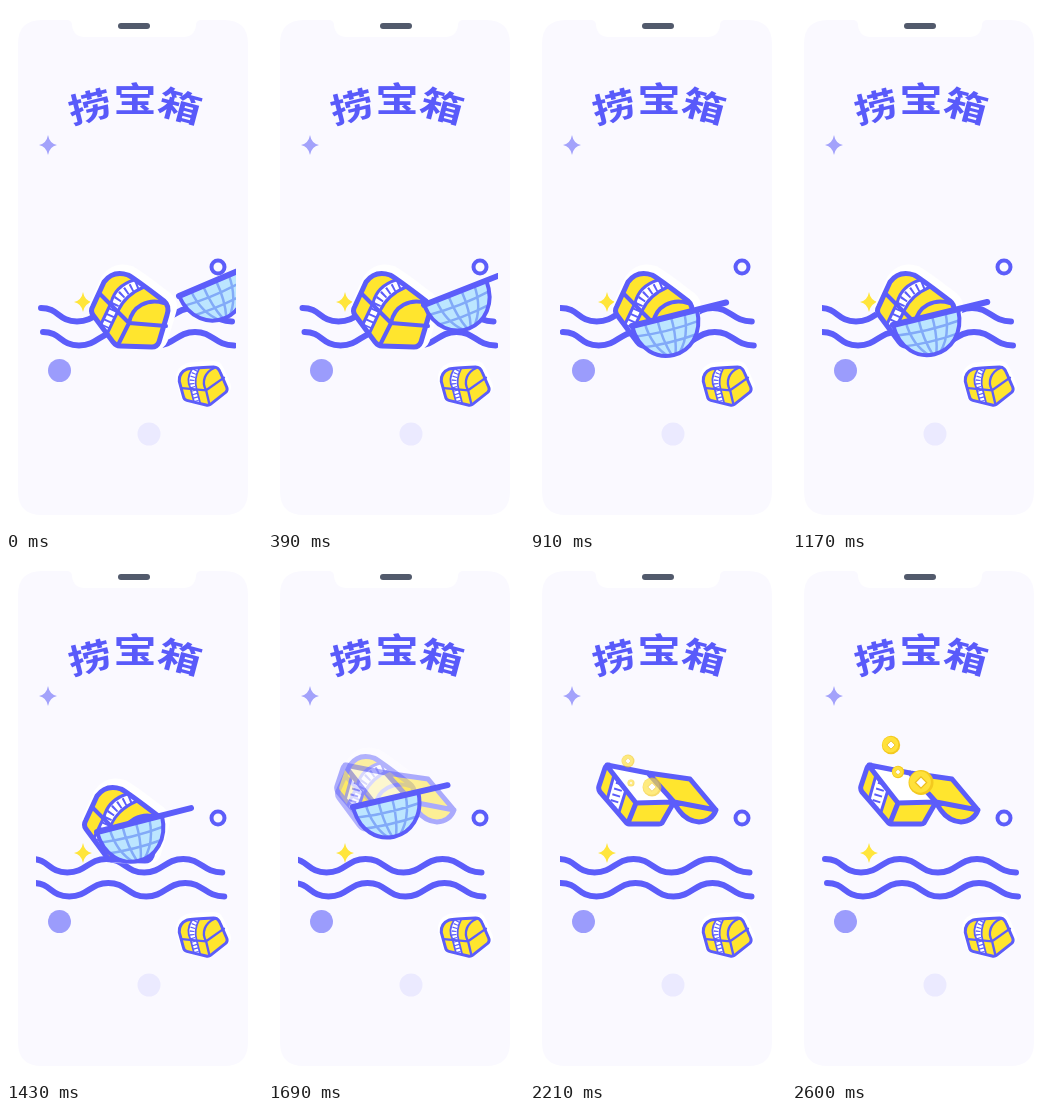
Recreate the animation shown at these times as an HTML page. Size 256x523 px, loop 3120 ms.

```html
<!DOCTYPE html>
<html lang="zh">
<head>
<meta charset="utf-8">
<style>
  html, body { margin: 0; width: 100%; height: 100%; overflow: hidden; background: #fff; }
  svg { display: block; width: 100%; height: 100%; }
  .line { fill: none; stroke: #5c5dfa; stroke-linecap: round; stroke-linejoin: round; }
  .title { font: 700 35px "Noto Sans CJK SC", "Noto Sans CJK", sans-serif; fill: #595afa; text-anchor: middle; }
</style>
</head>
<body>
<svg viewBox="0 0 256 523">
  <defs>
    <clipPath id="scene"><rect x="30" y="150" width="200" height="230"/></clipPath>
    <path id="wave" d="M33 302C51 302 50 315.500 69 315.500S90 302 108 302S128 315.500 146 315.500S167 302 185 302S205 315.500 224 315.500"/>
    <path id="shell" d="M87 300L98 276Q107 264 122 269Q128 272 158 295Q164 300 161 309L153 336Q151 341 146 341L114 340Q110 340 107 336L87 309Q84 305 87 300Z"/>
    <path id="bowl" d="M0 0C1 51 66 51 67 0Z"/>
    <clipPath id="bowlClip"><use href="#bowl"/></clipPath>
    <path id="star" d="M0-10Q1.500-1.500 9 0Q1.500 1.500 0 10Q-1.500 1.500-9 0Q-1.500-1.500 0-10Z"/>

    <g id="closedChest">
      <use href="#shell" transform="translate(3 -3)" fill="#fff" stroke="#fff" stroke-width="12"/>
      <use href="#shell" fill="#ffe52e"/>
      <path d="M128 274Q109 280 105 297L95 318L101 328L112 305Q119 289 138 281Z" fill="#fff"/>
      <path d="M132 279Q113 286 108 301L99 321" fill="none" stroke="#5c5dfa" stroke-width="8" stroke-dasharray="2 4"/>
      <path class="line" stroke-width="3" d="M128 274Q109 280 105 297L95 318M138 281Q119 289 112 305L101 328"/>
      <path class="line" stroke-width="4" d="M94 288L123 317L160 320M123 317L112 339M123 317C126 300 142 292 158 297"/>
      <use href="#shell" class="line" stroke-width="5"/>
    </g>

    <g id="coin">
      <circle r="10" fill="#f3c91f"/>
      <circle cx="-.7" cy="-.4" r="8.600" fill="#ffe13a"/>
      <path d="M0-4.500L4.500 0L0 4.500L-4.500 0Z" fill="#fff" stroke="#eebf20"/>
    </g>
  </defs>

  <path fill="#faf9ff" d="M36 14H60Q66 14 66 19Q67 31 79 31H177Q189 31 190 19Q190 14 196 14H218Q242 14 242 38V485Q242 509 218 509H36Q12 509 12 485V38Q12 14 36 14Z"/>
  <rect x="112" y="17" width="32" height="6" rx="3" fill="#525a6c"/>

  <g class="title">
    <text transform="translate(84 101) rotate(-14) scale(1.24 .98)" y="13">捞</text>
    <text transform="translate(129 93) scale(1.24 .98)" y="13">宝</text>
    <text transform="translate(174 100) rotate(15) scale(1.24 .98)" y="13">箱</text>
  </g>

  <use href="#star" transform="translate(42 139)" fill="#a3a2fb"/>
  <circle cx="53.500" cy="364.500" r="11.500" fill="#9b9cfc"/>
  <circle cx="143" cy="428" r="11.500" fill="#ebeaff"/>
  <circle class="line" cx="212" cy="261" r="6.500" stroke-width="4"/>
  <use href="#closedChest" transform="translate(196 378.500) rotate(-40) scale(.59) translate(-124 -305)"/>

  <g clip-path="url(#scene)">
    <g id="waves" class="line" stroke-width="6">
      <use href="#wave"/>
      <use href="#wave" x="2" y="24"/>
    </g>
    <use href="#star" transform="translate(77 296)" fill="#ffe53b"/>
    <use id="closed" href="#closedChest"/>

    <g id="open">
      <path fill="#fff" d="M77 208L118 216L144 245L106 246Z"/>
      <path fill="#ffe52e" d="M77 208L106 246L98 267L68 232ZM106 246L144 245L132 267H98ZM118 216L160 222L186 253Q166 276 144 245Z"/>
      <path fill="#fff" d="M84 218L96 233L89 255L77 243Z"/>
      <path d="M90 226L83 249" fill="none" stroke="#5c5dfa" stroke-width="8" stroke-dasharray="2 4"/>
      <path class="line" stroke-width="3" d="M84 218L77 243M96 233L89 255"/>
      <path class="line" stroke-width="5" d="M77 208L118 216L160 222L186 253Q182 264 169 265Q153 264 144 245L118 216M144 245L186 253M144 245L132 266Q131 267 129 267H99Q97 267 95 264L70 235Q68 232 69 229L75 211Q76 208 79 208M77 209L106 246L144 245M106 246L98 266"/>
    </g>

    <g id="net">
      <use href="#bowl" fill="#bce6ff"/>
      <g clip-path="url(#bowlClip)" fill="none" stroke="#82aaf8" stroke-width="2.500">
        <path d="M13 0Q14 25 29 39M26 0Q26 22 32 39M40 0Q41 22 35 39M54 0Q53 25 38 39M0 11Q33 15 67 11M0 23Q33 27 67 23"/>
      </g>
      <use href="#bowl" class="line" stroke-width="4"/>
      <path class="line" stroke-width="6" d="M0 0H97"/>
    </g>

    <g id="coins">
      <use href="#coin"/><use href="#coin"/><use href="#coin"/>
    </g>
  </g>
</svg>
<script>
const LOOP = 3120, STEP = 130;
const el = id => document.getElementById(id);
const coins = [...el("coins").children];

// Each key is [step, ...values]; values are interpolated linearly and held at both ends.
const WAVE = [[2, 2], [5, .5], [13, -10.5], [17, -4.5], [20, 0]];
const CHEST = [[9, 0, 0], [11, -7, -37], [12, -15, -66], [13, -16, -68]];
const NET = [[2, 173, 290, -23], [5, 122, 317, -18.5], [7, 102, 320, -14],
             [9, 101, 319, -13.7], [11, 91, 275, -14.3], [12, 85, 251, -13], [13, 85, 250, -13]];
const CLOSED_FADE = [[11, 1], [13, .45], [15, 0]];
const OPEN_FADE = [[11, 0], [13, .5], [15, 1]];
const NET_FADE = [[13, 1], [16, 0]];
const COIN_FADE = [[14, 0], [17, .65], [20, 1]];
// Coin keys hold x, y and radius.
const COINS = [
  [[14, 97, 220, 3], [17, 98, 204, 6.5], [20, 99, 188, 9.2]],
  [[14, 96, 237, 1], [17, 101, 226, 3.5], [20, 106, 215, 6.2]],
  [[14, 115, 234, 6], [17, 122, 230, 9.5], [20, 129, 225.500, 12.5]]
];

function sample(keys, step) {
  if (step <= keys[0][0]) return keys[0].slice(1);
  const i = keys.findIndex(key => key[0] >= step);
  if (i < 0) return keys.at(-1).slice(1);
  const a = keys[i - 1], b = keys[i];
  const p = (step - a[0]) / (b[0] - a[0]);
  return a.slice(1).map((v, j) => v + (b[j + 1] - v) * p);
}

const place = (node, transform) => node.setAttribute("transform", transform);
const fade = (node, keys, step) => node.setAttribute("opacity", sample(keys, step)[0]);

function draw(step) {
  place(el("waves"), `translate(${sample(WAVE, step)[0]} 0)`);
  place(el("closed"), `translate(${sample(CHEST, step).join(" ")})`);
  const [x, y, angle] = sample(NET, step);
  place(el("net"), `translate(${x} ${y}) rotate(${angle})`);
  fade(el("closed"), CLOSED_FADE, step);
  fade(el("open"), OPEN_FADE, step);
  fade(el("net"), NET_FADE, step);
  fade(el("coins"), COIN_FADE, step);
  coins.forEach((coin, i) => {
    const [cx, cy, r] = sample(COINS[i], step);
    place(coin, `translate(${cx} ${cy}) scale(${r / 10})`);
  });
}

const start = performance.now();
function tick() {
  draw(Math.floor((performance.now() - start) % LOOP / STEP));
  requestAnimationFrame(tick);
}
tick();
</script>
</body>
</html>
```
